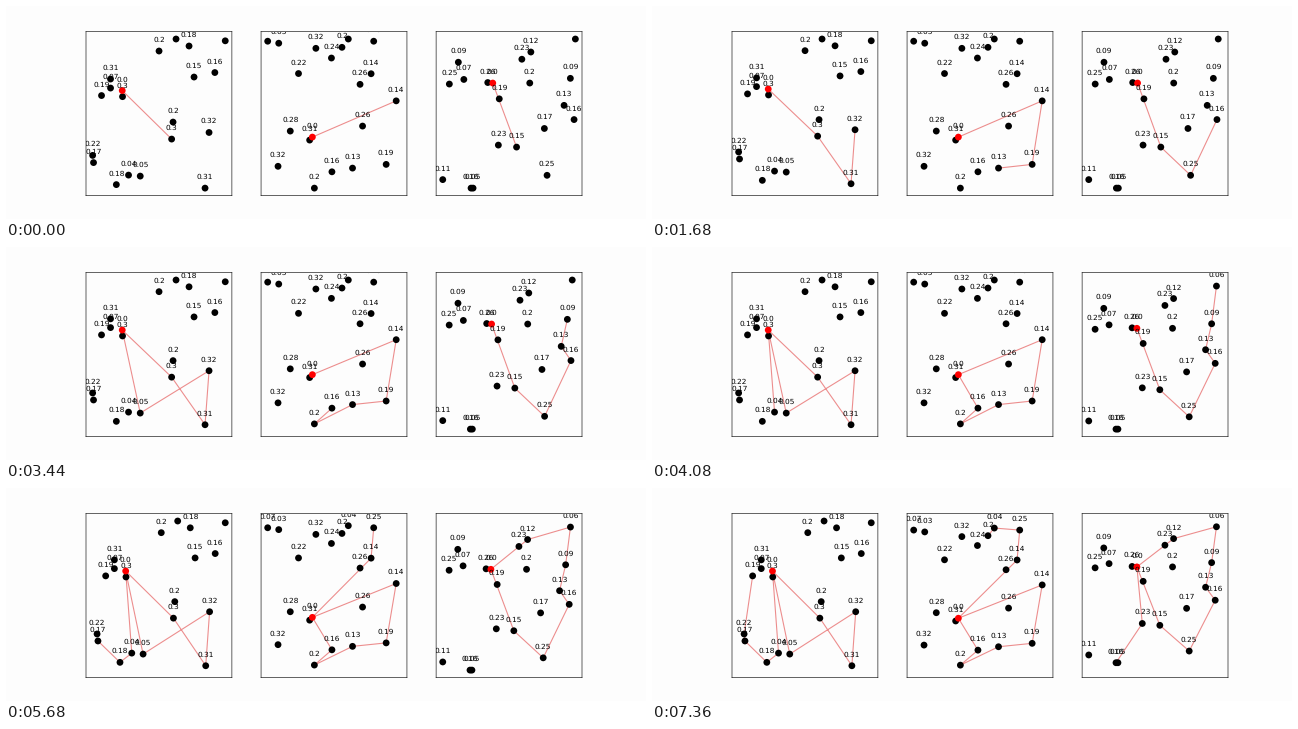
A matplotlib script for the animation above (8000 ms loop, 640 by 213 pixels).

```python
import matplotlib.pyplot as plt
from matplotlib.animation import FuncAnimation

W, H, DPI = 640, 213, 100
INTERVAL, FRAMES = 80, 100
HOLD = 10                 # frames per route leg
LEGS = 10
PX = 72 / DPI             # one pixel in points

plt.rcParams.update({"font.family": "DejaVu Sans", "text.hinting": "none",
                     "figure.facecolor": "#fdfdfd", "axes.facecolor": "#fdfdfd"})

# Nodes (x, y, demand): the depot, the stops in visiting order, then the rest.
# Routing instances are random, so each node is a key point of its own.
LEFT = [
    (116.2, 84.5, 0.0), (165.6, 133, .3), (199, 182, .31), (203, 126.4, .32),
    (134.2, 170, .05), (122.5, 169, .04), (110.3, 178.5, .18), (87.5, 156.5, .17),
    (86.6, 149.3, .22), (95.5, 89.5, .19), (104.5, 82, .07), (104.5, 73, .31),
    (116.5, 90.6, .3), (167, 116, .2), (153, 45, .2), (183, 40, .18),
    (188, 71, .15), (208.8, 66.5, .16), (170, 33, ""), (219.2, 34.8, ""),
]
MIDDLE = [
    (306.5, 131, 0.0), (390, 94.8, .14), (380, 158.3, .19), (346.5, 162, .13),
    (308.5, 182, .2), (326, 165.7, .16), (365, 67.7, .14), (367.6, 35.2, .25),
    (342.3, 33, .04), (336, 41.3, .2), (354, 78.3, .26), (325.5, 52, .24),
    (310, 42.3, .32), (292.7, 67.5, .22), (273, 37.2, .03), (262, 35.2, .07),
    (356.5, 120, .26), (284.5, 125, .28), (303.8, 134, .31), (272.3, 160.2, .32),
]
RIGHT = [
    (486.7, 77, 0.0), (510.5, 141, .15), (541, 169.2, .25), (568, 113.5, .16),
    (558, 99.3, .13), (564.3, 72.3, .09), (569.3, 33, .06), (524.8, 46, .12),
    (492.3, 139, .23), (465, 182, .16), (467, 182, .05), (515.8, 53.2, .23),
    (523.7, 77, .2), (493.2, 92.8, .19), (481.7, 76.5, .26), (452.3, 56.2, .09),
    (457.8, 73.4, .07), (443.3, 78, .25), (538.3, 122.4, .17), (436.7, 173.5, .11),
]


def padded(lo, hi):
    pad = 0.05 * (hi - lo)
    return lo - pad, hi + pad


def span(values, visited, reach, gain):
    """View limits: all nodes, plus a reach around each stop that grows per leg."""
    grow = [(v, reach + gain * leg) for leg, v in enumerate(visited)]
    return padded(min([*values, *(v - r for v, r in grow)]),
                  max([*values, *(v + r for v, r in grow)]))


class Panel:
    def __init__(self, ax, nodes, first_trip):
        self.ax = ax
        self.xs, self.ys, _ = zip(*nodes)
        stops = list(range(LEGS))
        stops.insert(first_trip + 1, 0)         # back to the depot once
        self.path_x = [self.xs[i] for i in stops]
        self.path_y = [self.ys[i] for i in stops]

        ax.set(xticks=[], yticks=[])
        for spine in ax.spines.values():
            spine.set(linewidth=0.6 * PX, snap=False)
        self.line, = ax.plot([], [], color="#dc1e1e", alpha=0.5,
                             lw=1.1 * PX, zorder=1)
        depot_last = nodes[1:] + nodes[:1]
        ax.scatter([n[0] for n in depot_last], [n[1] for n in depot_last],
                   s=(6.8 * PX) ** 2, linewidths=0, zorder=2,
                   c=["black"] * (len(nodes) - 1) + ["red"])
        for x, y, demand in nodes:
            ax.annotate(str(demand), (x, y), (0, 9.1 * PX),
                        textcoords="offset points", ha="center",
                        fontsize=5.3, clip_on=True, zorder=3)

    def show(self, leg):
        px, py = self.path_x[:leg + 1], self.path_y[:leg + 1]
        self.line.set_data(px, py)
        self.ax.set_xlim(span(self.xs, px, 3.9, 0.2))
        top, bottom = span(self.ys, py, 3.6, 0.45)
        self.ax.set_ylim(bottom, top)


fig, axes = plt.subplots(1, 3, figsize=(W / DPI, H / DPI), dpi=DPI)
panels = [Panel(ax, nodes, trip) for ax, nodes, trip
          in zip(axes, (LEFT, MIDDLE, RIGHT), (4, 5, 7))]


def update(frame):
    leg = max(1, (frame - 1) // HOLD + 1)
    for panel in panels:
        panel.show(leg)
    return [panel.line for panel in panels]


anim = FuncAnimation(fig, update, frames=FRAMES, interval=INTERVAL,
                     init_func=lambda: update(0), repeat=True, repeat_delay=0)
plt.show()
```
